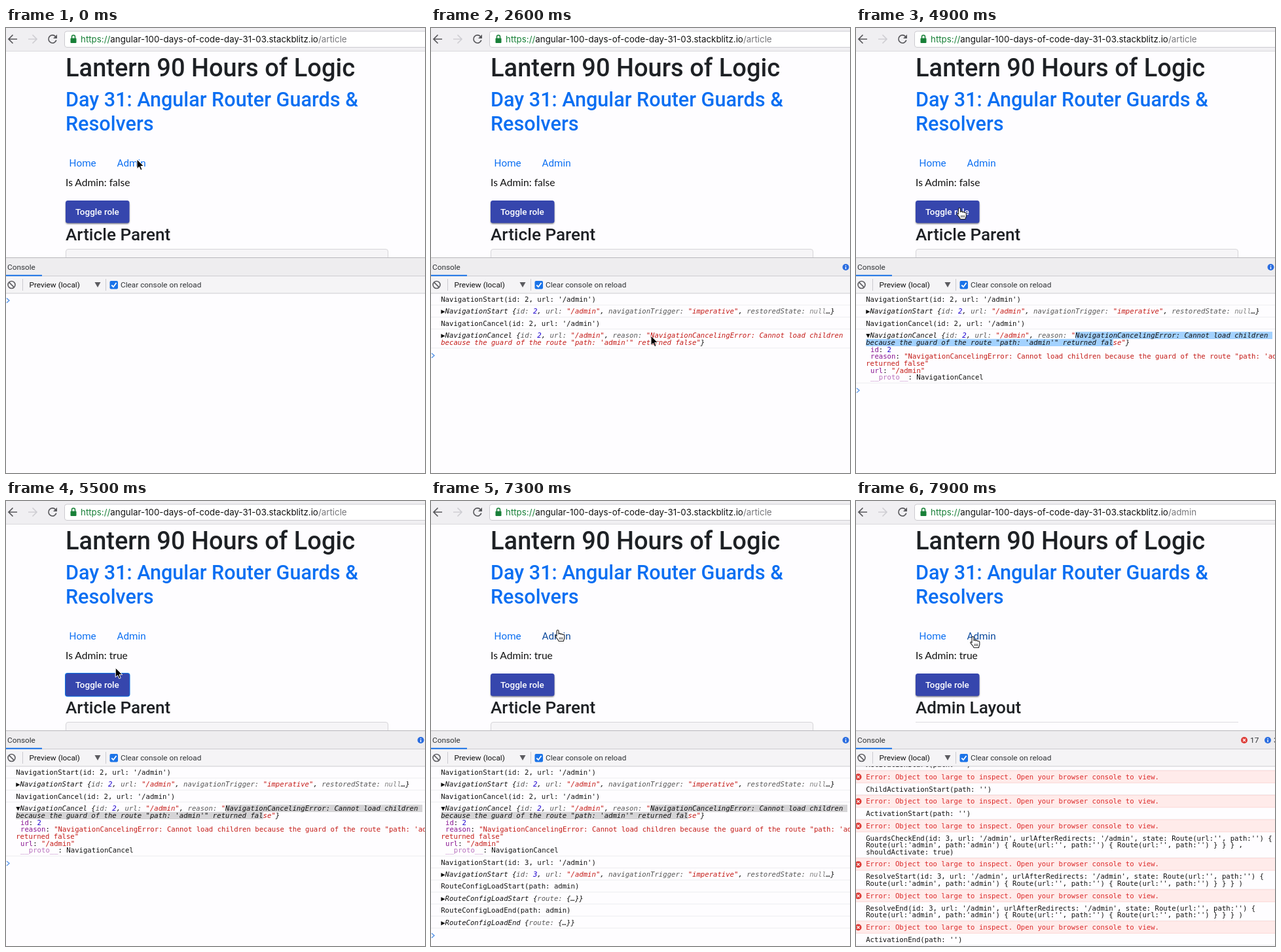
These frames come from a looping animation (640 by 681 pixels, 8 s). An HTML page:

```html
<!DOCTYPE html>
<html lang="en">
<head>
<meta charset="utf-8">
<title>Router guards demo</title>
<style>
  html, body { margin: 0; width: 100%; height: 100%; overflow: hidden; background: #fefdff; }
  svg { display: block; width: 640px; height: 681px; }
  text { white-space: pre; font-family: Roboto, "Open Sans", sans-serif; fill: #1e2125; }
  .head { font-weight: 500; }
  .link { fill: #0b6ff2; }
  .hover { fill: #0a489c; }
  .url { font: 13.35px Inter, sans-serif; }
  .ui { font-size: 11.8px; fill: #303336; }
  .log { font: 10.63px "DejaVu Sans Mono", "Liberation Mono", monospace; fill: #111; }
  .it { font-style: italic; }
  .str { fill: #c41a16; }
  .num { fill: #1c00cf; }
  .key { fill: #565656; }
  .prop { fill: #881391; }
  .proto { fill: #b871bd; }
  .nul { fill: #808080; }
  .err { fill: #dc2a2a; }
</style>
</head>
<body>
<svg viewBox="0 0 640 681" xmlns="http://www.w3.org/2000/svg">
  <defs>
    <clipPath id="pageClip"><rect y="36" width="640" height="315"/></clipPath>
    <clipPath id="logClip"><rect y="406" width="640" height="275"/></clipPath>
    <filter id="blur"><feGaussianBlur stdDeviation="1.2"/></filter>
    <g id="badgeError">
      <circle r="5" fill="#dd3b36"/>
      <path d="M-2-2L2 2M2-2L-2 2" stroke="#fff" stroke-width="1.2"/>
    </g>
    <g id="badgeInfo">
      <circle r="5" fill="#2a6de0"/>
      <path d="M0-.8V3M0-3V-1.7" stroke="#fff" stroke-width="1.4"/>
    </g>
  </defs>
  <rect width="640" height="681" fill="#fefdff"/>

  <g clip-path="url(#pageClip)">
    <text class="head" x="91" y="73.5" font-size="38">Lantern 90 Hours of Logic</text>
    <text class="head link" font-size="30.6"><tspan x="91" y="120">Day 31: Angular Router Guards &amp;</tspan><tspan x="91" y="157">Resolvers</tspan></text>
    <text class="link" x="96.5" y="211.5" font-size="15.3">Home</text>
    <text id="admin" class="link" x="169.5" y="211.5" font-size="15.3">Admin</text>
    <text id="role" x="91" y="242" style="font:15.6px Lato,sans-serif;fill:#111"></text>
    <rect id="shadow" x="91" y="266" width="97.5" height="34" rx="4" fill="#000" opacity=".45" filter="url(#blur)"/>
    <rect id="focus" x="90" y="263" width="99.5" height="36.5" rx="4" fill="#0d72e0"/>
    <rect x="91" y="264" width="97.5" height="34.5" rx="3.5" fill="#3646ad"/>
    <text class="head" x="106" y="286" font-size="13.5" style="fill:#fff">Toggle role</text>
    <text id="section" class="head" x="91" y="324.5" font-size="26.1"></text>
    <rect id="card" x="91.5" y="338.5" width="492" height="40" rx="3.5" fill="#f6f5f7" stroke="#d6d5d8"/>
    <path id="rule" d="M91 338.5H584" stroke="#dddce0"/>
  </g>

  <rect width="640" height="36" fill="#f0eff2"/>
  <path d="M0 35.5H640" stroke="#dbdade"/>
  <rect x="89.5" y="5" width="560" height="24.5" rx="3.5" fill="#fff" stroke="#cccbd0"/>
  <g fill="none" stroke="#57575b" stroke-width="1.7">
    <path d="M17 17H4.5M10.5 10.5L4 17l6.5 6.5"/>
    <path d="M34 17H46.5M40.5 10.5L47 17l-6.5 6.5" stroke="#cfced3"/>
    <path d="M75.5 13A6 6 0 1 0 76.8 18.5"/>
  </g>
  <path d="M78 10V16H72Z" fill="#57575b"/>
  <rect x="98.5" y="15.5" width="9" height="7.5" rx="1" fill="#188038"/>
  <path d="M100.5 16V13.5a2.5 2.5 0 0 1 5 0V16" fill="none" stroke="#188038" stroke-width="1.5"/>
  <text class="url" x="114" y="21.8"><tspan fill="#188038">https://</tspan><tspan fill="#111">angular-100-days-of-code-day-31-03.stackblitz.io</tspan><tspan id="path" fill="#77777b"></tspan></text>

  <rect y="351" width="640" height="28" fill="#eeedef"/>
  <rect y="379" width="640" height="27" fill="#f5f4f6"/>
  <path d="M0 351.5H640" stroke="#b9b8bc"/>
  <path d="M0 379.5H640M0 406H640" stroke="#cdccd0"/>
  <path d="M0 378.8H55" stroke="#1a73e8" stroke-width="2"/>
  <text class="ui" x="2" y="370">Console</text>
  <g fill="none" stroke="#5f5f63" stroke-width="1.6"><circle cx="8.5" cy="393" r="5.5"/><path d="M4.6 389.1L12.4 396.9"/></g>
  <path d="M25.5 384V402M152.5 384V402" stroke="#cbcace"/>
  <text class="ui" x="35.5" y="397" style="fill:#111">Preview (local)</text>
  <path d="M135.5 389H144.5L140 397Z" fill="#5c5c60"/>
  <rect x="158.5" y="387" width="12.5" height="12.5" rx="2" fill="#1a73e8"/>
  <path d="M161.3 393.5L164 396.2L168.5 390" fill="none" stroke="#fff" stroke-width="1.8"/>
  <text class="ui" x="175" y="397">Clear console on reload</text>
  <use id="info" href="#badgeInfo" y="366"/>
  <g id="errors">
    <use href="#badgeError" x="593" y="366"/>
    <text id="errorCount" class="ui" x="602" y="370"></text>
    <text id="infoCount" class="ui" x="638" y="370"></text>
  </g>

  <g clip-path="url(#logClip)"><g id="log"></g></g>

  <circle id="press" r="20.5" fill="none" stroke="#111" stroke-width="1.5"/>
  <path id="arrow" d="M0 0V14.5L3.4 11.4L5.7 16.6L8 15.6L5.8 10.5H10.5Z" fill="#000" stroke="#fff"/>
  <g id="hand" fill="#fff" stroke="#222" stroke-width="1.1" stroke-linejoin="round">
    <path d="M-1.5 9.5V1.5A1.5 1.5 0 0 1 1.5 1.5V6C2.5 4.6 4.6 5 4.6 6.5C5.4 5.5 7.4 5.8 7.4 7.2C8.3 6.4 10.3 6.8 10.3 8.5V12C10.3 14 9 14.5 9 17H1.5C1 14.5 -2 12.5 -3.5 9.8C-4.3 8.2 -2.5 7.6 -1.5 9.5Z"/>
    <path d="M2.8 11V14.5M5 11V14.5M7.2 11V14.5" stroke-width=".9"/>
  </g>
</svg>
<script>
const DURATION = 8000, STEP = 100;
const CHAR = 6.4, LINE = 10.67, LEFT = 15.2, LOG_TOP = 406;
const $ = id => document.getElementById(id);
const show = (el, on) => el.setAttribute('visibility', on ? 'inherit' : 'hidden');
const move = (el, x, y) => el.setAttribute('transform', `translate(${x} ${y})`);

function add(parent, tag, attrs = {}, text) {
  const el = document.createElementNS('http://www.w3.org/2000/svg', tag);
  for (const name in attrs) el.setAttribute(name, attrs[name]);
  if (text !== undefined) el.textContent = text;
  return parent.appendChild(el);
}

// A line is a list of plain strings and [text, class] pairs.
function addLine(parent, parts, x, y, style = '') {
  const text = add(parent, 'text', { class: 'log ' + style, x, y });
  return parts.map(part => Array.isArray(part)
    ? add(text, 'tspan', { class: part[1] }, part[0])
    : add(text, 'tspan', {}, part));
}

const startObject = id => ({ object: true, lines: [[
  '▶NavigationStart {', ['id: ', 'key'], [id, 'num'], ', ', ['url: ', 'key'], ['"/admin"', 'str'], ', ',
  ['navigationTrigger: ', 'key'], ['"imperative"', 'str'], ', ', ['restoredState: ', 'key'], ['null', 'nul'], '…}'
]] });
const routeObject = name => ({ object: true, lines: [[`▶${name} {`, ['route: ', 'key'], '{…}}']] });
const plain = (...lines) => ({ lines: lines.map(line => [line]) });
const error = { error: true, lines: [['Error: Object too large to inspect. Open your browser console to view.']] };
const withError = (...lines) => [plain(...lines), error];
const routed = (name, tail = ')', ...more) => withError(
  `${name}(id: 3, url: '/admin', urlAfterRedirects: '/admin', state: Route(url:'', path:'') {`,
  `Route(url:'admin', path:'admin') { Route(url:'', path:'') { Route(url:'', path:'') } } } ${tail}`, ...more);

const reasonStart = 'NavigationCancelingError: Cannot load children';
const reasonEnd = `because the guard of the route "path: 'admin'" returned false"`;
const cancelObject = { object: true, lines: [
  ['▶', 'NavigationCancel {', ['id: ', 'key'], ['2', 'num'], ', ', ['url: ', 'key'], ['"/admin"', 'str'], ', ',
    ['reason: ', 'key'], ['"', 'str'], '', ['', 'str']],
  ['', ['', 'str'], '}']
] };

const rows = [
  plain("NavigationStart(id: 2, url: '/admin')"), startObject('2'),
  plain("NavigationCancel(id: 2, url: '/admin')"), cancelObject,
  plain("NavigationStart(id: 3, url: '/admin')"), startObject('3'),
  plain('RouteConfigLoadStart(path: admin)'), routeObject('RouteConfigLoadStart'),
  plain('RouteConfigLoadEnd(path: admin)'), routeObject('RouteConfigLoadEnd'),
  ...routed('RoutesRecognized'), ...routed('GuardsCheckStart'),
  ...withError("ChildActivationStart(path: '')"), ...withError("ActivationStart(path: 'admin')"),
  ...withError("ChildActivationStart(path: 'admin')"), ...withError("ActivationStart(path: '')"),
  ...withError("ChildActivationStart(path: '')"), ...withError("ActivationStart(path: '')"),
  ...routed('GuardsCheckEnd', ',', 'shouldActivate: true)'),
  ...routed('ResolveStart'), ...routed('ResolveEnd'),
  plain("ActivationEnd(path: '')")
];
const CANCEL = 3, TREE_HEIGHT = 5 * LINE;

const log = $('log');
const views = rows.map((row, i) => {
  const height = (row.error ? 19.1 : 18.4) + (row.lines.length - 1) * LINE;
  const g = add(log, 'g');
  if (row.error) {
    add(g, 'rect', { y: 0, width: 640, height, fill: '#ffebea' });
    add(g, 'path', { d: `M0 .3H640M0 ${height - .3}H640`, stroke: '#fcd3d2', 'stroke-width': .8 });
    add(g, 'use', { href: '#badgeError', x: 3.5, y: 9.8 });
  }
  const marks = i === CANCEL && [0, 1].map(() => add(g, 'rect', { height: 11.2 }));
  const spans = row.lines.map((line, n) =>
    addLine(g, line, LEFT, 13 + n * LINE, row.error ? 'err' : row.object ? 'it' : ''));
  const border = row.error ? null : add(g, 'path', { d: 'M0 0H640', stroke: '#ededf0' });
  return { g, height, marks, spans, border };
});

const tree = add(views[CANCEL].g, 'g');
[
  [['id', 'prop'], ': ', ['2', 'num']],
  [['reason', 'prop'], ': ', [`"${reasonStart} because the guard of the route "path: 'admin'"`, 'str']],
  [['returned false"', 'str']],
  [['url', 'prop'], ': ', ['"/admin"', 'str']],
  [['__proto__', 'proto'], ': NavigationCancel']
].forEach((line, n) => addLine(tree, line, n === 2 ? LEFT : LEFT + 6.8, 13 + (n + 2) * LINE));
const prompt = add(log, 'path', { d: 'M1-3.5L5 0L1 3.5', fill: 'none', stroke: '#4a8de8', 'stroke-width': 1.3 });

const pointerKeys = [
  [0, 200, 201], [400, 200, 201], [1100, 182, 203.5], [1800, 182, 203.5], [2600, 336, 471], [2800, 336, 471],
  [3600, 414, 479], [3800, 393, 480], [4000, 393, 480], [4700, 158, 275.5], [5300, 158, 275.5],
  [5900, 193.5, 197.5], [7700, 193.5, 197.5], [7900, 178.5, 207.5], [8000, 178.5, 207.5]
];
const presses = [[1500, 1700], [2800, 3800], [5100, 5300], [7100, 7300]];
// Time, rows present, anchored row and the height it stands at.
const logStates = [
  [0, 0], [1700, 4], [7300, 10], [7500, 12], [7600, 33, 5, 410.5], [7800, 33, 21, 412.5]
];
const lastAt = (list, t) => list.filter(item => item[0] <= t).pop();

function pointerAt(t) {
  const i = Math.max(1, pointerKeys.findIndex(key => key[0] > t));
  const [t0, x0, y0] = pointerKeys[i - 1], [t1, x1, y1] = pointerKeys[i];
  const u = (t - t0) / (t1 - t0), e = u * u * (3 - 2 * u);
  return [x0 + (x1 - x0) * e, y0 + (y1 - y0) * e];
}

function drawSelection(t) {
  const { marks, spans } = views[CANCEL];
  const [x, y] = pointerAt(Math.min(t, 3800));
  const from = LEFT + 50 * CHAR;
  const active = t >= 2800;
  const wrapped = active && y > 475;
  const charsTo = (left, max) => Math.max(0, Math.min(max, Math.round((x - left) / CHAR)));
  const first = wrapped ? reasonStart.length : active ? charsTo(from, reasonStart.length) : 0;
  const second = wrapped ? charsTo(LEFT, reasonEnd.length) : 0;
  const [a, b] = spans;
  a[10].textContent = reasonStart.slice(0, first);
  a[11].textContent = reasonStart.slice(first);
  b[0].textContent = reasonEnd.slice(0, second);
  b[1].textContent = reasonEnd.slice(second);
  [[from, first + wrapped, 3.6], [LEFT, second, 14.6]].forEach(([left, chars, top], i) => {
    marks[i].setAttribute('x', left);
    marks[i].setAttribute('y', top);
    marks[i].setAttribute('width', chars * CHAR);
    marks[i].setAttribute('fill', t < 5200 ? '#a3d2ff' : '#d5d4d6');
  });
}

function drawLog(t) {
  const [, count, anchor, anchorY] = lastAt(logStates, t);
  const open = t >= 3800;
  let y = LOG_TOP, scroll = 0;
  views.forEach((view, i) => {
    if (i === anchor) scroll = anchorY - y;
    show(view.g, i < count);
    if (i >= count) return;
    move(view.g, 0, y);
    const height = view.height + (i === CANCEL && open ? TREE_HEIGHT : 0);
    if (view.border) move(view.border, 0, height - .4);
    y += height;
  });
  show(tree, open && count > CANCEL);
  views[CANCEL].spans[0][0].textContent = open ? '▼' : '▶';
  move(prompt, 0, y + 11);
  move(log, 0, scroll);
  drawSelection(t);
}

function draw(t) {
  const [x, y] = pointerAt(t);
  const within = (l, r, top, bottom) => x > l && x < r && y > top && y < bottom;
  const overAdmin = t >= 300 && within(167, 215, 195, 218);
  const pointing = overAdmin || within(91, 188, 264, 299);
  show($('arrow'), !pointing);
  show($('hand'), pointing);
  show($('press'), presses.some(([from, to]) => t >= from && t < to));
  ['arrow', 'hand', 'press'].forEach(id => move($(id), x, y));

  const focused = t >= 5200 && t < 7300;
  const loaded = t >= 7500;
  $('admin').setAttribute('class', overAdmin ? 'hover' : 'link');
  $('role').textContent = 'Is Admin: ' + (t >= 5200);
  show($('focus'), focused);
  show($('shadow'), !focused);
  $('section').textContent = loaded ? 'Admin Layout' : 'Article Parent';
  show($('card'), !loaded);
  show($('rule'), loaded);
  $('path').textContent = t >= 7800 ? '/admin' : '/article';

  show($('info'), t >= 1700);
  $('info').setAttribute('x', loaded ? 629 : 633.5);
  show($('errors'), loaded);
  $('errorCount').textContent = t < 7600 ? 1 : t < 7800 ? 10 : t < 7900 ? 14 : 17;
  $('infoCount').textContent = t < 7800 ? 2 : 3;
  drawLog(t);
}

function frame(now) {
  draw(Math.floor(now % DURATION / STEP) * STEP);
  requestAnimationFrame(frame);
}
draw(0);
requestAnimationFrame(frame);
</script>
</body>
</html>
```
